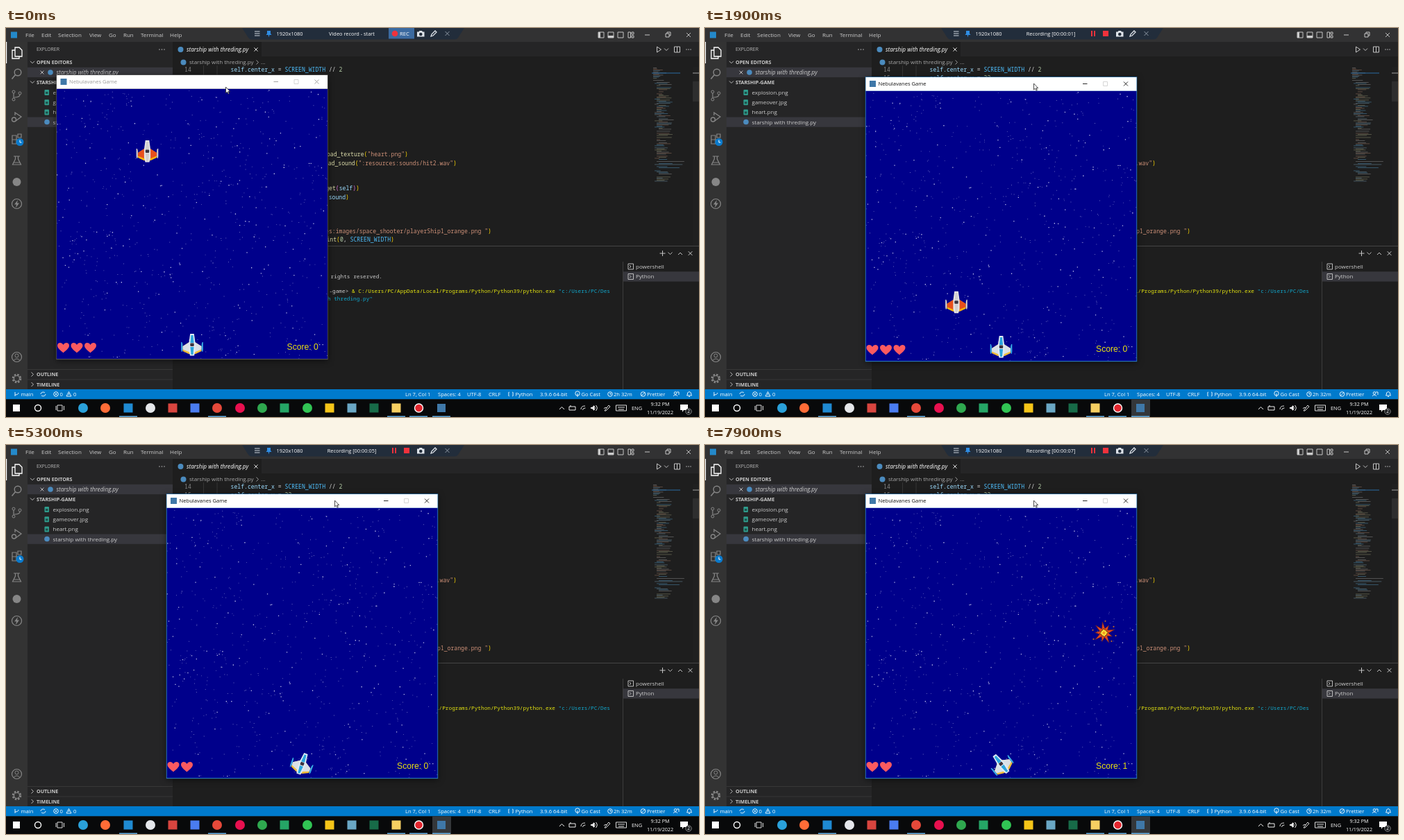
An HTML page that plays this animation: 998x561 px, repeating every 8000 ms.

```html
<!DOCTYPE html>
<html lang="en">
<head>
<meta charset="utf-8">
<title>Starship</title>
<style>
html, body { margin: 0; width: 100%; height: 100%; overflow: hidden; background: #1e1e1e; }
svg { display: block; width: 998px; height: 561px; }
text { font-family: "Open Sans", "Noto Sans", sans-serif; white-space: pre; }
.mono { font-family: "Noto Sans Mono", "DejaVu Sans Mono", monospace; }
.score { font-family: "Liberation Sans", sans-serif; }
</style>
</head>
<body>
<svg id="stage" viewBox="0 0 998 561"></svg>
<script>
const stage = document.getElementById('stage');
const LOOP = 8000, STEP = 100;

// ---- drawing helpers ----
let seed = 11;
const rnd = () => (seed = (seed * 16807) % 2147483647) / 2147483647;
const esc = s => s.replace(/&/g, '&amp;').replace(/</g, '&lt;');
const rect = (x, y, w, h, fill, more = '') => `<rect x="${x}" y="${y}" width="${w}" height="${h}" fill="${fill}" ${more}/>`;
const dot = (x, y, r, fill, more = '') => `<circle cx="${x}" cy="${y}" r="${r}" fill="${fill}" ${more}/>`;
const ring = (x, y, r, color = '#fff', w = .9) => dot(x, y, r, 'none', `stroke="${color}" stroke-width="${w}"`);
const line = (d, color = '#c5c5c5', w = 1) => `<path d="${d}" fill="none" stroke="${color}" stroke-width="${w}"/>`;
const shape = (d, fill, more = '') => `<path d="${d}" fill="${fill}" ${more}/>`;
const text = (x, y, s, size = 8, fill = '#ccc', more = '') =>
  `<text x="${x}" y="${y + size * .36}" font-size="${size}" fill="${fill}" ${more}>${esc(s)}</text>`;
// parts: colour, string, colour, string...
const code = (x, y, size, anchor, ...parts) => {
  let spans = '';
  for (let i = 0; i < parts.length; i += 2) spans += `<tspan fill="${parts[i]}">${esc(parts[i + 1])}</tspan>`;
  return `<text class="mono" x="${x}" y="${y + size * .33}" font-size="${size}" text-anchor="${anchor}">${spans}</text>`;
};
const cross = (x, y, r, color, w) => line(`M${x - r} ${y - r}l${2 * r} ${2 * r}m0 ${-2 * r}l${-2 * r} ${2 * r}`, color, w);
const chevron = (x, y, right, color = '#ccc') =>
  line(right ? `M${x - 1.5} ${y - 3}l3 3l-3 3` : `M${x - 3} ${y - 1.5}l3 3l3 -3`, color, .9);
const ITALIC = 'font-style="italic"', BOLD = 'font-weight="700"', MID = 'text-anchor="middle"';
const FILE = 'starship with threding.py';

// ---- editor ----
function titleBar() {
  const menu = [[28, 'File'], [51, 'Edit'], [75, 'Selection'], [120, 'View'], [148, 'Go'], [169, 'Run'], [194, 'Terminal'], [236, 'Help']];
  return rect(0, 0, 998, 20, '#323233') + rect(7, 5.5, 9, 9, '#2489ca') +
    menu.map(([x, s]) => text(x, 10, s)).join('') +
    line('M853 6h8v8h-8zM867 6h8v8h-8zM881 6h8v8h-8zM896 6h3.5v8h-3.5zM901 6h3v3h-3zM901 11h3v3h-3z') +
    rect(853, 6, 3, 8, '#ccc') + rect(867, 11, 8, 3, '#ccc') +
    line('M920 10h7M950 8h5v5h-5zM952 8v-2h5v5h-2') + cross(983, 10, 3, '#ccc', .9);
}

function activityBar() {
  const c = '#868686';
  return rect(0, 20, 31, 501, '#333') + rect(0, 20, 1.2, 31, '#fff') +
    line('M13 28h6l4 4v9h-10zM13 32h-4v12h10v-3', '#fff', 1.3) +
    ring(17, 64, 4.8, c, 1.4) + line('M13.5 67.5l-5 6', c, 1.5) +
    line('M11 94v7M20 96q0 4 -8 4', c, 1.2) + ring(11, 92, 2, c, 1) + ring(20, 94, 2, c, 1) + ring(11, 103, 2, c, 1) +
    line('M13 126v-4l9 6l-8 6', c, 1.3) + ring(11.5, 132, 3, c, 1.3) +
    line('M9 155h6v12h-6zM9 161h12v6h-12M17 153h5v5h-5z', c, 1.2) +
    dot(20, 164.5, 5.5, '#0a7acc') + line('M20 161.5v3.5h2.5', '#fff', 1) +
    line('M11 185h9M13.5 185v4l-4 8h12l-4 -8v-4M11 194h9', c, 1.2) +
    dot(15.5, 222, 6, c) +
    ring(15.5, 253.5, 7, c, 1.2) + shape('M17 248l-5 6.5h3l-1 5l5 -7h-3z', c) +
    ring(15.5, 474.5, 7, c, 1.2) + ring(15.5, 472.5, 2.5, c, 1) + line('M11 479.5q4.5 -5 9 0', c) +
    dot(15.5, 505.5, 5.5, 'none', `stroke="${c}" stroke-width="2.6" stroke-dasharray="2.5 1.82"`) + ring(15.5, 505.5, 4, c, 1.2);
}

function sideBar() {
  const image = (y, name) => rect(55.5, y - 4, 6.5, 8, '#2f9c8c', 'rx="1"') + rect(57, y - 1, 3.5, 3, '#1f4f4a') + text(67.5, y, name);
  const section = (y, s, right) => chevron(38, y, right) + text(44, y, s, 7.1, '#ccc', BOLD);
  return rect(31, 20, 209, 501, '#252526') + text(44, 31, 'EXPLORER', 6.85, '#bbb') +
    [221, 224.5, 228].map(x => dot(x, 31, .7, '#ccc')).join('') +
    section(49.3, 'OPEN EDITORS') + rect(31, 56.8, 209, 14.3, '#37373d') +
    cross(52, 64, 2.4, '#ccc', .9) + dot(64, 64, 3.8, '#4b8bbe') + text(72.5, 64, FILE, 8.2, '#ccc', ITALIC) +
    section(78, 'STARSHIP-GAME') +
    image(93, 'explosion.png') + image(107.3, 'gameover.jpg') + image(121.5, 'heart.png') +
    rect(31, 128.5, 209, 14.3, '#37373d') + dot(59, 135.5, 3.8, '#4b8bbe') + text(67.5, 135.8, FILE) +
    line('M31 492.5h209M31 507h209', '#3c3c3c', .8) +
    section(499.5, 'OUTLINE', true) + section(514, 'TIMELINE', true);
}

function minimap() {
  const hues = ['#6f93a8', '#8a8a8a', '#9a7563', '#4f8fb8', '#8f8f70'];
  let out = '';
  for (let i = 0; i < 110; i++) {
    const indent = i < 14 ? 0 : [2, 5, 5, 8][Math.floor(rnd() * 4)];
    const w = 5 + rnd() * (i > 88 && i < 102 ? 38 : 17);
    if (rnd() > .13) out += rect(932 + indent, 57 + i * 1.5, w.toFixed(1), .8, hues[Math.floor(rnd() * 5)], 'opacity=".6"');
  }
  return out + rect(930, 64.5, 41, 1, '#2a6da3') + rect(989, 56, 9, 258, '#202020') +
    rect(989, 77, 9, 29, '#2e2e2e') + rect(989, 64.5, 9, 1, '#a0a0a0');
}

function editor() {
  const V = '#9cdcfe', W = '#d4d4d4', K = '#4fc1ff', F = '#dcdcaa', S = '#ce9178', N = '#b5cea8', P = '#ffd700', Q = '#da70d6';
  const row = n => 60 + 12.27 * n;
  const end = (x, n, ...parts) => code(x, row(n), 8.14, 'end', ...parts);
  return rect(240, 20, 758, 501, '#1e1e1e') + rect(368, 20, 630, 21, '#252526') +
    dot(251.5, 31, 4, '#4b8bbe') + text(260, 31, FILE, 8.2, '#fff', ITALIC) + cross(360, 31, 2.6, '#ddd', 1) +
    line('M937.5 27l6 4l-6 4z') + chevron(951, 31, false) + line('M962.5 27h8v8h-8zM966.5 27v8') +
    [980, 983, 986].map(x => dot(x, 31, .7, '#ccc')).join('') +
    dot(255.5, 49.5, 4, '#4b8bbe') + text(264, 49.5, FILE, 8, '#a9a9a9') + chevron(362, 49.5, true, '#a9a9a9') + text(367, 49.5, '...', 8, '#a9a9a9') +
    line('M284.5 54v24M304 54v24', '#404040', .7) +
    code(257, row(0), 8.14, 'start', '#858585', '14') + code(257, row(1), 8.14, 'start', '#858585', '15') +
    code(323.5, row(0), 8.14, 'start', V, 'self.center_x ', W, '= ', K, 'SCREEN_WIDTH ', W, '// ', N, '2') +
    code(323.5, row(1), 8.14, 'start', V, 'self.center_y ', W, '= ', N, '32') +
    end(579, 10, F, 'load_texture', P, '(', S, '"heart.png"', P, ')') +
    end(649, 11, F, 'load_sound', P, '(', S, '":resources:sounds/hit2.wav"', P, ')') +
    end(509, 14, F, 'target', Q, '(', V, 'self', Q, ')', P, ')') +
    end(494, 15, V, 'self.sound', P, ')') +
    end(699, 19, S, '":resources:images/space_shooter/playerShip1_orange.png "', P, ')') +
    end(559, 20, F, 'randint', P, '(', N, '0', W, ', ', K, 'SCREEN_WIDTH', P, ')') + minimap();
}

function panel() {
  const G = '#ccc', Y = '#e5e510', C = '#11a8cd', size = 7.76;
  const shell = (y, s) => line(`M896 ${y - 4}h7.5v8h-7.5zM898 ${y - 2}l2 2l-2 2`, '#ccc', .9) + text(907, y, s);
  return rect(240, 314, 758, .9, '#4a4a4a') +
    code(542, 358.5, size, 'end', G, 'All rights reserved.') +
    code(870, 379.5, size, 'end', G, '-game> ', Y, '& C:/Users/PC/AppData/Local/Programs/Python/Python39/python.exe ', C, '"c:/Users/PC/Des') +
    code(528, 390, size, 'end', C, 'starship with threding.py"') +
    line('M888.5 337v184', '#3c3c3c') + rect(889, 351.3, 109, 14.3, '#37373d') +
    shell(344, 'powershell') + shell(358.5, 'Python') +
    line('M945.5 321v8M941.5 325h8') + chevron(956.5, 325, false) + line('M968 327l3 -3l3 3') + cross(985.5, 325, 2.8, '#ccc', 1);
}

function statusBar() {
  const s = (x, str) => text(x, 528, str, 7.6, '#fff');
  const w = d => line(d, '#fff', .9);
  return rect(0, 521, 998, 14.5, '#007acc') +
    w('M13 525v6M18 526q0 3 -5 3') + s(21.5, 'main') +
    w('M50 528a3.5 3 0 0 1 6 -2M57 528a3.5 3 0 0 1 -6 2') +
    ring(72, 528, 3.3) + cross(72, 528, 1.3, '#fff', .8) + s(77.5, '0') +
    w('M87 531l3.5 -6.5l3.5 6.5zM90.5 527v2') + s(97, '0') +
    s(575, 'Ln 7, Col 1') + s(622, 'Spaces: 4') + s(664, 'UTF-8') + s(695, 'CRLF') +
    w('M725 525q-2 0 -1 3q-1 3 1 3M729 525q2 0 1 3q1 3 -1 3') + s(733.5, 'Python') + s(769, '3.9.6 64-bit') +
    ring(823, 527, 3.2) + w('M823 527v5') + s(828.5, 'Go Cast') +
    ring(870, 528, 3.3) + w('M870 526v2h2') + s(875, '2h 32m') +
    ring(917.5, 528, 3.3) + w('M915 530.5l5 -5') + s(923, 'Prettier') +
    ring(964, 526.5, 1.8) + w('M961 531q3 -4 6 0M966 525h3v4') +
    w('M980.5 530h7l-1 -2v-2q-2.5 -3 -5 0v2zM983 531.5h2');
}

function taskBar() {
  const round = [[111, '#2aa1da'], [143, '#ff6c37'], [208, '#e4e6ea'], [304, '#e5493a'], [337, '#e8104f'], [369, '#2fa84f'], [434, '#31c454']];
  const square = [[176, '#1f8ad2'], [240, '#d8453f'], [272, '#4a7cf0'], [401, '#25a566'], [466, '#f5c518'], [498, '#6aa7c4'], [530, '#176b48'], [562, '#f6cf62']];
  const open = [176, 304, 562, 594, 627];
  return rect(0, 535.5, 998, 25.5, '#08090a') + rect(614, 535.5, 27, 25.5, '#34373a', 'id="glow"') +
    open.map(x => rect(x - 13, 559.5, 26, 1.5, '#5fa9dd')).join('') +
    rect(10, 543, 10, 10, '#fff') + ring(46, 548, 4.5, '#fff', 1.4) +
    round.map(([x, c]) => dot(x, 548, 7, c)).join('') +
    square.map(([x, c]) => rect(x - 6.5, 541.5, 13, 13, c)).join('') +
    line('M74 544h7v8h-7zM72 545v6M83.5 545v6', '#ddd', 1) +
    dot(594.5, 548, 6, '#e3262e', 'stroke="#fff" stroke-width="1.4"') + rect(621, 542, 12, 12, '#3f78a8') +
    line('M797 550l3.5 -3.5l3.5 3.5M811 546h9v5h-9zM813 544v2M847 545q2.5 3 0 6M849.5 544q3.5 4 0 8', '#eee', 1) +
    line('M828 550q0 -5 6 -5M830.5 551q0 -3 4 -3M862 552l6 -8l2 2l-6 6zM861 549q2 -3 4 -1', '#ddd', 1) +
    shape('M842 547h2l3 -3v8l-3 -3h-2z', '#eee') + line('M878.5 544h15v8h-15zM881 547h10M882 550h8', '#ddd', 1) +
    text(901, 548, 'ENG', 7.4, '#fff') + text(942, 542, '9:32 PM', 7.2, '#fff', MID) + text(942, 554, '11/19/2022', 7.2, '#fff', MID) +
    shape('M971 543h11v8h-6l-2 3v-3h-3z', '#fff') + dot(983, 553, 4.3, '#1a1c1e', 'stroke="#aaa" stroke-width=".7"') + text(983, 553, '2', 6.5, '#fff', MID);
}

function recorder() {
  const red = '#f0323c';
  return shape('M340 0h320l-9 14q-1.5 2.5 -5 2.5h-292q-3.5 0 -5 -2.5z', '#222d3b') +
    line('M358 5h7.5M358 8h7.5M358 11h7.5', '#cfd6de', 1) + shape('M376 4h5v4l1.5 2h-3.2l-.8 3.5l-.8 -3.5h-3.2l1.5 -2z', '#2f8de4') +
    text(389.5, 8, '1920x1080', 7.45, '#fff') + text(498, 8.5, '', 7.4, '#fff', MID + ' id="recText"') +
    '<g id="idle">' + rect(551, 0, 37, 15.5, '#3b6aa0') + dot(560, 8, 4.3, red) + text(567, 8.2, 'REC', 7.7, '#fff') + '</g>' +
    '<g id="busy">' + rect(556, 4, 2, 8, red) + rect(560, 4, 2, 8, red) + rect(573, 4, 8, 8, red) + '</g>' +
    shape('M592 5.5h2.5l1 -1.5h3.5l1 1.5h2.5v7h-10.5z', '#dfe4ea') + dot(597.3, 9, 2.3, '#222d3b') +
    line('M612 12l1 -3l5 -5l2 2l-5 5z', '#dfe4ea', 1.3) + cross(635.5, 8, 3, '#8d97a3', 1);
}

// ---- game ----
const ship = (body, stripe, wing, edge, prong) =>
  shape('M-4 -4L-13.5 2V9L-5 13H5L13.5 9V2L4 -4z', edge) +
  shape('M-4 -4L-13.5 2V6.5L-5 10H5L13.5 6.5V2L4 -4z', wing) +
  shape('M-15.8 -4h1.2l.9 3v8.5l-.8 2.5h-.7l-.6 -3zM15.8 -4h-1.2l-.9 3v8.500l.8 2.500h.7l.6 -3z', prong) +
  shape('M-2.8 -16h5.600L4.600 -3V9L3 15.500H-3L-4.600 9V-3z', body) +
  shape('M-1.500 -14h3L2.600 -3H-2.600zM-2.600 3h5.200l-1.200 11h-2.800z', stripe) +
  rect(-2.7, -2.5, 5.4, 4.5, '#3b3340', 'rx="1"');

const heart = x => shape('M0 7.5C-3 4.5 -8.5 1 -8.5 -3C-8.5 -8 -2 -8.5 0 -4C2 -8.5 8.5 -8 8.5 -3C8.5 1 3 4.5 0 7.5z', '#fb5a60', `transform="translate(${x} 393)"`);

const star = (n, outer, inner) => {
  let d = '';
  for (let i = 0; i < 2 * n; i++) {
    const r = i % 2 ? inner : outer * (i % 4 ? .8 : 1), a = i * Math.PI / n - 1.7;
    d += (i ? 'L' : 'M') + (r * Math.cos(a)).toFixed(1) + ' ' + (r * Math.sin(a)).toFixed(1);
  }
  return d + 'z';
};

const blast = () => shape(star(9, 16, 6.5), '#e84a1c', 'stroke="#5e2030" stroke-width=".8"') +
  shape(star(8, 6.5, 4.2), '#ffe03a', 'stroke="#7a3614" stroke-width="1"') + dot(0, 0, 2, '#f59a20') +
  [[-16, -4], [-15, 9], [2, -17], [14, -9], [17, 4], [11, 12]].map(([x, y]) => rect(x - 1, y - 1, 2, 2, '#b5662f', `transform="rotate(30 ${x} ${y})"`)).join('');

const bullet = id => `<g id="${id}">` + shape('M-2.3 -15Q0 -19 2.3 -15L.5 17H-.5z', '#d8402e') + shape('M-1.1 -14Q0 -17 1.1 -14L.2 8H-.2z', '#ffe0d0') + '</g>';

function gameWindow() {
  let dim = '', bright = '';
  for (let i = 0; i < 820; i++) {
    const big = rnd() > .8, s = big ? 1.3 : .9;
    const d = `M${(rnd() * 389).toFixed(1)} ${(20 + rnd() * 388).toFixed(1)}h${s}v${s}h${-s}z`;
    if (big) bright += d; else dim += d;
  }
  return '<g id="win">' + rect(-.7, -.7, 391.4, 410.9, '#555', 'id="frame" style="filter:drop-shadow(0 2px 4px #0008)"') +
    rect(0, 0, 390, 19.7, '#fff') + rect(5.5, 5, 9, 9, '#3f78a8') +
    '<g id="caption">' + text(18, 9.5, 'Nebulavanes Game', 7.6, 'currentColor') +
    line('M312.5 9.5h6.5', 'currentColor', .9) + cross(374.5, 9.5, 3, 'currentColor', .9) + '</g>' +
    line('M342 6.5h6v6h-6z', '#ccc', .8) +
    '<clipPath id="sky">' + rect(0, 19.7, 390, 389.5, '#000') + '</clipPath><g clip-path="url(#sky)">' +
    rect(0, 19.7, 390, 389.5, '#00008b') + shape(dim, '#7272c4') + shape(bright, '#b9b9e6') +
    '<g id="enemy">' + ship('#e6e4e4', '#d2cfd0', '#e8501c', '#f5b50f', '#ddd6cf') + '</g>' +
    '<g id="blast" transform="translate(343 200)">' + blast() + '</g>' + bullet('shot0') + bullet('shot1') +
    '<g id="player">' + ship('#dfeaf2', '#2aa5de', '#d9e0e6', '#f0bd3a', '#39b0e6') + '</g>' +
    heart(9.5) + heart(29) + '<g id="life">' + heart(48.5) + '</g>' +
    text(331.5, 391.5, '', 12.2, '#e8e010', 'class="score" id="score"') + '</g></g>';
}

const cursor = id => shape('M0 0V9L2.1 7.1L3.5 10.2L4.9 9.5L3.5 6.6H6.2z', '#fff', `id="${id}" stroke="#222" stroke-width=".8"`);

stage.innerHTML = editor() + activityBar() + sideBar() + panel() + statusBar() + titleBar() + recorder() + taskBar() + gameWindow() + cursor('grab') + cursor('lead');

// ---- motion ----
const el = id => document.getElementById(id);
const show = (id, on) => el(id).style.display = on ? '' : 'none';
const place = (id, x, y, a = 0) => el(id).setAttribute('transform', `translate(${x} ${y}) rotate(${a})`);
const track = (keys, t) => {
  const i = keys.findIndex(k => k[0] > t);
  if (i < 0) return keys[keys.length - 1][1];
  if (!i) return keys[0][1];
  const [t0, a] = keys[i - 1], [t1, b] = keys[i];
  return a + (b - a) * (t - t0) / (t1 - t0);
};

const winX = [[400, 73], [600, 91], [700, 226], [800, 231.5]];
const winY = [[300, 68], [600, 70], [800, 71]];
const firstY = [[0, 110], [600, 161.5], [1100, 207], [1800, 311], [2600, 421]];
const nextY = [[5400, 27], [6200, 148.5], [6600, 200]];
const turn = [[2700, 0], [2800, 5], [2900, 0], [3000, 0], [3100, -4], [3500, -4], [3600, 0], [3700, 0], [4000, 14],
  [4200, 14], [4600, 30], [4800, 30], [5300, 20], [5400, 20], [5900, 40], [6200, 58], [6600, 64], [6800, 64],
  [7500, -32], [7600, -32], [7700, -35], [7800, -35], [7900, -38]];
const shots = [{ start: 5350, angle: 20, end: 6500 }, { start: 5946, angle: 39.6, end: 6600 }];

function draw(t) {
  const x = track(winX, t), y = track(winY, t), active = t >= 400, rec = t >= 300;
  place('win', x, y);
  el('caption').style.color = active ? '#111' : '#999';
  el('frame').setAttribute('fill', active ? '#2a78b8' : '#555');
  show('glow', active);
  place('grab', x + (active ? 242 : 243.5), y + track([[0, 17], [400, 9]], t));
  place('lead', 468, 79.5);
  show('lead', t === 600);

  show('enemy', t < 2600 || (t >= 5400 && t < 6600));
  if (t < 2600) place('enemy', 130.5, track(firstY, t));
  else place('enemy', 342.5, track(nextY, t));
  place('player', 195, 389, track(turn, t));
  shots.forEach((s, i) => {
    const d = (t - s.start) * .39, a = s.angle * Math.PI / 180;
    show('shot' + i, d > 0 && t < s.end);
    place('shot' + i, 195 + d * Math.sin(a), 389 - d * Math.cos(a), s.angle);
  });
  show('blast', t >= 6600);
  show('life', t < 2600);
  el('score').textContent = 'Score: ' + (t >= 6600 ? 1 : 0);

  show('idle', !rec);
  show('busy', rec);
  el('recText').textContent = rec ? `Recording [00:00:0${Math.floor((t - 300) / 1000)}]` : 'Video record - start';
}

function frame() {
  const t = (performance.now() + 1) % LOOP;
  draw(Math.floor(t / STEP) * STEP);
  requestAnimationFrame(frame);
}
frame();
</script>
</body>
</html>
```
